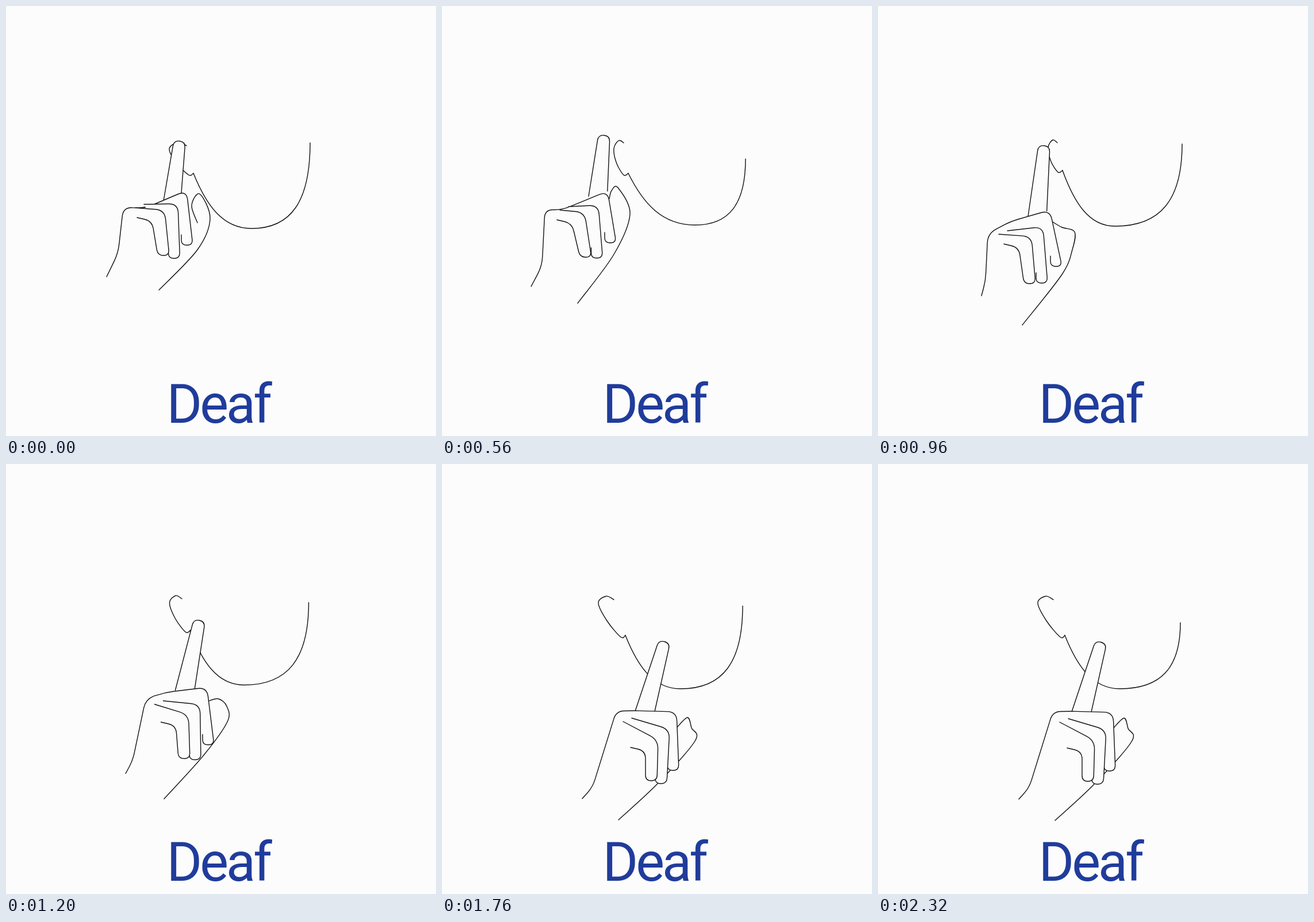
An HTML page for the animation above (2400 ms loop, 748 by 748 pixels).

```html
<!DOCTYPE html>
<html lang="en">
<head>
<meta charset="utf-8">
<title>Deaf</title>
<style>
  html, body { margin: 0; width: 100%; height: 100%; overflow: hidden; background: #fcfcfc; }
  svg { display: block; width: 100%; height: 100%; }
  path { fill: #fcfcfc; stroke: #111; stroke-width: 1.4; stroke-linecap: round; stroke-linejoin: round; }
  .ear, .jaw { fill: none; }
  text { font: 400 94px Roboto, Lato, sans-serif; letter-spacing: -4px; fill: #203c9b; }
</style>
</head>
<body>
<svg viewBox="0 0 748 748">
  <g id="drawing"></g>
  <text x="279.5" y="725">Deaf</text>
</svg>
<script>
const LOOP = 2400, STEP = 80;

const add = ([x, y], dx, dy) => [x + dx, y + dy];
const mix = (a, b, k) => a.map((v, i) => v + (b[i] - v) * k);
const toward = (a, b, length) => {
  const distance = Math.hypot(b[0] - a[0], b[1] - a[1]);
  return distance ? mix(a, b, length / distance) : a;
};
const mapPose = (pose, f) => Object.fromEntries(Object.entries(pose).map(([name, p]) => [name, f(p, name)]));
const shift = (pose, dx, dy) => mapPose(pose, p => add(p, dx, dy));

// Landmarks of the head and hand in each main pose.
const headTouched = { hook: [314, 243], ear: [284, 249], lobe: [326, 291], chin: [427, 387], jaw: [529, 238] };
const headFree = { hook: [316, 238], ear: [299, 248], lobe: [324, 291], chin: [440, 381], jaw: [528, 266] };
const headPassing = { hook: [312, 238], ear: [296, 246], lobe: [321, 286], chin: [412, 383], jaw: [529, 240] };
const headFinal = { hook: [299, 236], ear: [272, 242], lobe: [319, 298], chin: [415, 391], jaw: [523, 247] };

const handEar = {
  wrist: [175, 471], arm: [195, 430], corner: [204, 350], ridge: [241, 352],
  knuckle: [314, 321], middleTip: [315, 416], base: [274, 339], indexTip: [302, 235],
  crease: [225, 351], pinkyKnuckle: [276, 355], pinkyTip: [274, 434],
  thumbStart: [333, 377], thumbSide: [323, 347], thumbTop: [337, 327],
  heel: [355, 370], palm: [333, 424], cuff: [266, 494]
};
const handAway = {
  wrist: [155, 488], arm: [174, 452], corner: [179, 354], ridge: [208, 355],
  knuckle: [288, 322], middleTip: [293, 412], base: [255, 331], indexTip: [282, 225],
  crease: [205, 355], pinkyKnuckle: [248, 359], pinkyTip: [250, 437],
  thumbStart: [291, 335], thumbSide: [295, 321], thumbTop: [306, 316],
  heel: [327, 362], palm: [299, 432], cuff: [236, 517]
};
const handPassing = {
  wrist: [180, 504], arm: [187, 478], corner: [191, 396], ridge: [230, 375],
  knuckle: [299, 355], middleTip: [310, 453], base: [261, 366], indexTip: [289, 243],
  crease: [210, 397], pinkyKnuckle: [267, 401], pinkyTip: [264, 483],
  thumbStart: [303, 375], thumbSide: [320, 385], thumbTop: [342, 393],
  heel: [338, 424], palm: [320, 467], cuff: [251, 555]
};
const handChin = {
  wrist: [244, 582], arm: [262, 562], corner: [303, 430], ridge: [330, 429],
  knuckle: [408, 431], middleTip: [402, 533], base: [336, 430], indexTip: [387, 309],
  crease: [315, 448], pinkyKnuckle: [376, 480], pinkyTip: [364, 551],
  thumbStart: [408, 459], thumbSide: [427, 441], thumbTop: [434, 459],
  heel: [440, 482], palm: [375, 556], cuff: [307, 619]
};

const times = [0, 240, 560, 960, 1440, 1760, 2320];
const heads = [
  headTouched,
  { ...headTouched, hook: [308, 242], chin: [417, 384], jaw: [529, 275] },
  headFree,
  headPassing,
  shift(headFinal, 1, -5),
  headFinal,
  { ...shift(headFinal, 6, 0), jaw: [526, 276] }
];
const hands = [
  handEar,
  { ...handEar, indexTip: [305, 235], cuff: [255, 507] },
  handAway,
  handPassing,
  { ...shift(handChin, -8, -9), indexTip: [384, 301] },
  handChin,
  shift(handChin, 1, 1)
];

// Smooth curve through all points.
function curve(pts) {
  const at = i => pts[Math.max(0, Math.min(pts.length - 1, i))];
  const handle = (i, sign) => at(i).map((v, j) => v + sign * (at(i + 1)[j] - at(i - 1)[j]) / 6);
  return pts.slice(1).reduce((d, p, i) => `${d}C${handle(i, 1)} ${handle(i + 1, -1)} ${p}`, 'M' + pts[0]);
}

// Straight edges with rounded corners.
function rounded(pts, radius = 16) {
  let d = 'M' + pts[0];
  for (let i = 1; i < pts.length - 1; i++) {
    const [a, p, b] = pts.slice(i - 1, i + 2);
    const half = q => Math.hypot(q[0] - p[0], q[1] - p[1]) / 2;
    const cut = Math.min(radius, half(a), half(b));
    d += `L${toward(p, a, cut)}Q${p} ${toward(p, b, cut)}`;
  }
  return d + 'L' + pts[pts.length - 1];
}

function ear({ hook, ear, lobe }) {
  const low = add(lobe, -8, 3);
  return curve([hook, add(mix(hook, ear, .5), 0, -9), ear, add(mix(ear, low, .5), -4, 2), low, lobe]);
}

function jaw({ lobe, chin, jaw }) {
  const [lx, ly] = lobe, [cx, cy] = chin, [jx, jy] = jaw;
  const w = cx - lx, h = cy - ly;
  return `M${lobe}C${lx + .22 * w} ${ly + .57 * h} ${cx - .5 * w} ${cy} ${chin}` +
    `C${cx + .68 * (jx - cx)} ${cy} ${jx} ${jy + .68 * (cy - jy)} ${jaw}`;
}

function indexFinger({ base, knuckle, indexTip }) {
  const right = toward(base, knuckle, 34);
  const foot = mix(base, right, .5);
  const [dx, dy] = toward([0, 0], [indexTip[0] - foot[0], indexTip[1] - foot[1]], 10);
  return rounded([base, add(indexTip, dy, -dx), add(indexTip, -dy, dx), right]);
}

// A bent finger, ending in a round tip.
const bent = (start, knuckle, tip, end = [add(tip, -10, -18)]) =>
  rounded([...start, knuckle, add(tip, 10, 0), add(tip, -10, 0), ...end]);

function ringFinger(h) {
  const knuckle = add(mix(h.knuckle, h.pinkyKnuckle, .5), 4, 6);
  const tip = add(mix(h.middleTip, h.pinkyTip, .5), -2, 14);
  return bent([add(h.crease, 15, -6)], knuckle, tip);
}

function pinky({ crease, pinkyKnuckle, pinkyTip }) {
  const inner = add(pinkyKnuckle, -22, 19);
  return bent([crease], pinkyKnuckle, pinkyTip, [inner, add(inner, -26, -6)]);
}

// Drawn back to front; filled parts hide what lies behind them.
const parts = {
  ear,
  jaw,
  indexFinger,
  thumb: h => curve([h.thumbStart, h.thumbSide, h.thumbTop, h.heel, h.palm, h.cuff]),
  back: h => bent([h.wrist, h.arm, h.corner, h.ridge], h.knuckle, h.middleTip),
  ringFinger,
  pinky
};

const drawing = document.getElementById('drawing');
const paths = mapPose(parts, (_, name) => {
  const path = document.createElementNS('http://www.w3.org/2000/svg', 'path');
  path.setAttribute('class', name);
  return drawing.appendChild(path);
});

function draw(time) {
  const t = Math.floor((time % LOOP) / STEP) * STEP;
  const i = Math.max(1, times.findIndex(stop => t <= stop));
  const u = (t - times[i - 1]) / (times[i] - times[i - 1]);
  const k = u * u * (3 - 2 * u);
  const between = poses => mapPose(poses[i - 1], (p, name) => mix(p, poses[i][name], k));
  const pose = { ...between(heads), ...between(hands) };
  for (const name in parts) paths[name].setAttribute('d', parts[name](pose));
}

const start = performance.now();
function tick() {
  draw(performance.now() - start);
  requestAnimationFrame(tick);
}
tick();
</script>
</body>
</html>
```
